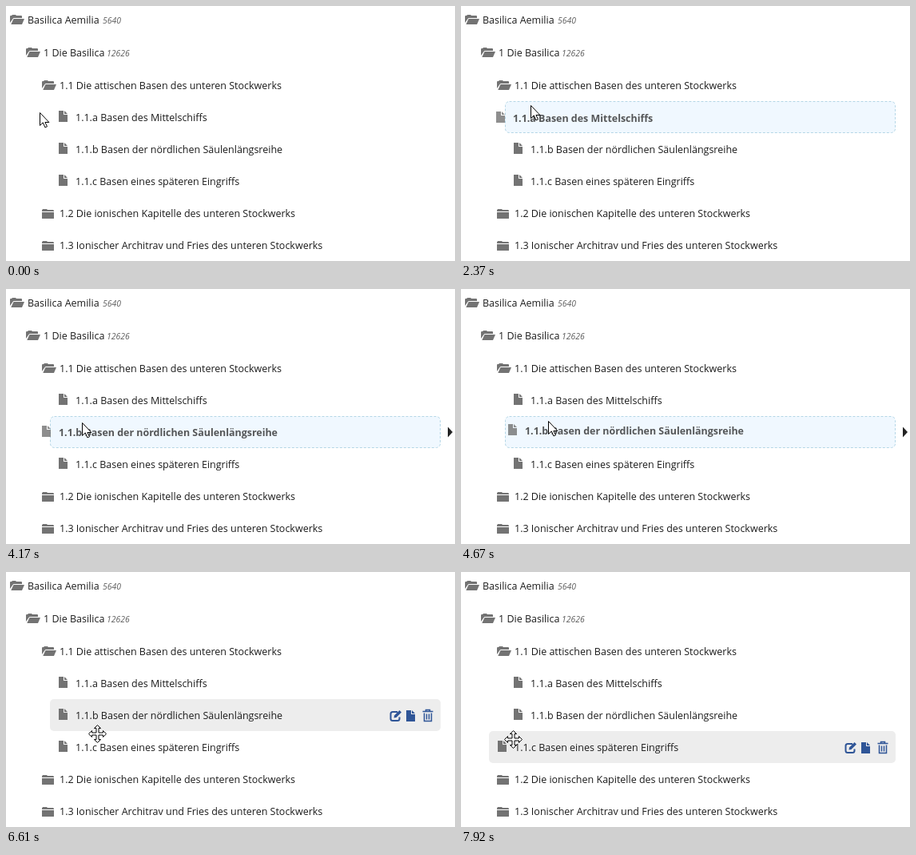
Recreate the animation shown at these times as an HTML page. Size 562 by 319 pixels, loop 9570 ms.

```html
<!DOCTYPE html>
<html lang="de">
<head>
<meta charset="utf-8">
<title>Baumansicht</title>
<style>
html, body { margin: 0; width: 100%; height: 100%; overflow: hidden; background: #fff; }
svg { display: block; width: 562px; height: 319px; }
text { font: 12.5px "Open Sans", "Noto Sans", sans-serif; fill: #1c1c1c; }
.count { font-size: 10.4px; font-style: italic; fill: #5f5f5f; }
.icon { fill: #737373; }
.dragged { opacity: .8; }
.dragged text { font-weight: 700; font-size: 12.45px; fill: #2e2e2e; }
</style>
</head>
<body>
<svg id="stage" viewBox="0 0 562 319">
  <defs>
    <path id="open" d="M0 10V2q0-1 1-1h1l1-1h4l1 1h6q1 0 1 1v2H5q-1 0-1.5 1zM5 5h13l-3 7H1.3L4 6q.3-1 1-1z"/>
    <path id="closed" d="M0 4V2.500l1-1.500h5l1 1h7l1 1v1zM0 5h15v7.500q0 .5-.5.500H.5q-.5 0-.5-.5z"/>
    <path id="file" d="M0 0H6v5h5v9H0zM7 0l4 4H7z"/>
    <path id="arrow" d="M0 0v16l3.800-3.600 2.600 6 2.600-1.100-2.600-5.300h5z"/>
    <path id="move" d="M0-11-4-7H-1.500v5.500H-7V-4l-4 4 4 4V1.500h5.500V7H-4l4 4 4-4H1.500V1.500H7V4l4-4-4-4v2.500H1.500V-7H4z"/>
  </defs>
  <rect id="hover" height="40" rx="5" fill="#ededed"/>
  <rect id="slot" height="39" rx="5" fill="#f0f8ff" stroke="#b4d6e6" stroke-dasharray="3 2"/>
  <path id="right" d="M553 172.500l6 6.500-6 6.500z" fill="#222"/>
  <path id="left" d="M46 172.500l-6 6.500 6 6.500z" fill="#222"/>
  <g id="rows"></g>
  <g id="actions" fill="#2f5597">
    <path d="M490 135h-6q-2.500 0-2.500 2.500v6q0 2.500 2.500 2.500h6q2.500 0 2.500-2.500v-2" fill="none" stroke="#2f5597" stroke-width="2"/>
    <path d="M486 139.500l6.500-6.500 2.500 2.500-6.500 6.500-3 .5z"/>
    <use href="#file" x="501" y="133"/>
    <path d="M521.500 134.500h13M525.500 134v-1.500h5v1.500M523.500 136.500v10h9v-10M526.500 137.500v7M529.500 137.500v7" fill="none" stroke="#2f5597" stroke-width="1.500"/>
  </g>
  <use id="cursor" fill="#fff" stroke="#000"/>
</svg>
<script>
const LOOP = 9570, RIGHT = 544;
const $ = id => document.getElementById(id);

function add(parent, tag, attrs, text = "") {
  const el = document.createElementNS("http://www.w3.org/2000/svg", tag);
  set(el, attrs);
  el.textContent = text;
  return parent.appendChild(el);
}
function set(el, attrs) {
  for (const key in attrs) el.setAttribute(key, attrs[key]);
}
const show = (el, on) => el.style.display = on ? "" : "none";

// icon, indent level, row centre, label, optional count and its x
const rows = [
  ["open", 0, 17, "Basilica Aemilia", "5640", 121],
  ["open", 1, 58, "1 Die Basilica", "12626", 126],
  ["open", 2, 99, "1.1 Die attischen Basen des unteren Stockwerks"],
  ["file", 3, 139, "1.1.a Basen des Mittelschiffs"],
  ["file", 3, 179, "1.1.b Basen der nördlichen Säulenlängsreihe"],
  ["file", 3, 219, "1.1.c Basen eines späteren Eingriffs"],
  ["closed", 2, 259, "1.2 Die ionischen Kapitelle des unteren Stockwerks"],
  ["closed", 2, 299, "1.3 Ionischer Architrav und Fries des unteren Stockwerks"]
].map(([icon, level, y, label, count, countX]) => {
  const group = add($("rows"), "g", {});
  const x = level * 20 + (icon === "file" ? 6 : 5);
  add(group, "use", { href: "#" + icon, class: "icon", x, y: y - (icon === "file" ? 8 : 6) });
  add(group, "text", { x: 27 + level * 20, y: y + 5 }, label);
  if (count) add(group, "text", { x: countX, y: y + 5, class: "count" }, count);
  return { group, y };
});
const items = rows.slice(3, 6);

// time, x, y of the pointer
const path = [
  [340, 42, 133], [610, 109, 123],
  [1600, 109, 123], [1850, 87, 123], [2120, 116, 123], [2370, 87, 124],
  [3150, 87, 124], [3450, 109, 162], [3640, 116, 167],
  [4000, 116, 167], [4300, 81, 167], [4670, 109, 165], [4740, 109, 165], [5200, 90, 165],
  [6220, 90, 165], [6610, 114, 202], [6700, 110, 211],
  [7110, 110, 211], [7840, 65, 209]
];

// start, first movement, release, and return of the hover state
const drags = [
  { item: 0, start: 1140, moving: 1600, end: 2730, settled: 2760 },
  { item: 1, start: 3940, moving: 4000, end: 5370, settled: 5400 },
  { item: 2, start: 6910, moving: 7110, end: 7890, settled: 7920 }
];
const hoverStarts = [400, 3480, 6640];

function pointerAt(t) {
  const next = path.findIndex(p => p[0] > t);
  if (next === 0) return path[0].slice(1);
  if (next < 0) return path.at(-1).slice(1);
  const [t0, x0, y0] = path[next - 1], [t1, x1, y1] = path[next];
  const u = (t - t0) / (t1 - t0), e = u * u * (3 - 2 * u);
  return [x0 + (x1 - x0) * e, y0 + (y1 - y0) * e].map(Math.round);
}

function draw(t) {
  const [px, py] = pointerAt(t);
  const drag = drags.find(d => t >= d.start && t < d.settled);
  const held = drag && t < drag.end;
  const active = hoverStarts.filter(s => t >= s).length - 1;
  const hovering = active >= 0 && !drag;
  const [gx, gy] = drag ? pointerAt(drag.start) : [px, py];
  const dx = px - gx, dy = py - gy;
  const outdent = t >= drags[2].end || (held && drag.item === 2 && dx < -20) ? -20 : 0;

  items.forEach(({ group }, i) => {
    const dragged = held && drag.item === i;
    const shift = i === 2 && t >= drags[2].end ? -20 : 0;
    set(group, {
      class: dragged ? "dragged" : "",
      transform: dragged ? `translate(${dx} ${dy})` : `translate(${shift} 0)`
    });
  });

  const top = active < 0 ? 119 : items[active].y - 20;
  const left = 55 + outdent;
  set($("hover"), { x: left, y: top, width: RIGHT - left });
  set($("slot"), { x: left + .5, y: top + .5, width: RIGHT - left - 1 });
  set($("actions"), { transform: `translate(0 ${top - 119})` });
  set($("right"), { transform: `translate(0 ${top - 159})` });
  set($("left"), { transform: `translate(${outdent} ${top - 159})` });
  show($("hover"), hovering);
  show($("actions"), hovering);
  show($("slot"), held);
  show($("right"), held && drag.item > 0);
  show($("left"), held && drag.item === 2);

  const crossed = hovering || (drag && t < drag.moving);
  set($("cursor"), { href: crossed ? "#move" : "#arrow", x: px + .5, y: py + .5 });
}

const begin = performance.now();
function tick() {
  draw((performance.now() - begin) % LOOP);
  requestAnimationFrame(tick);
}
draw(0);
requestAnimationFrame(tick);
</script>
</body>
</html>
```
